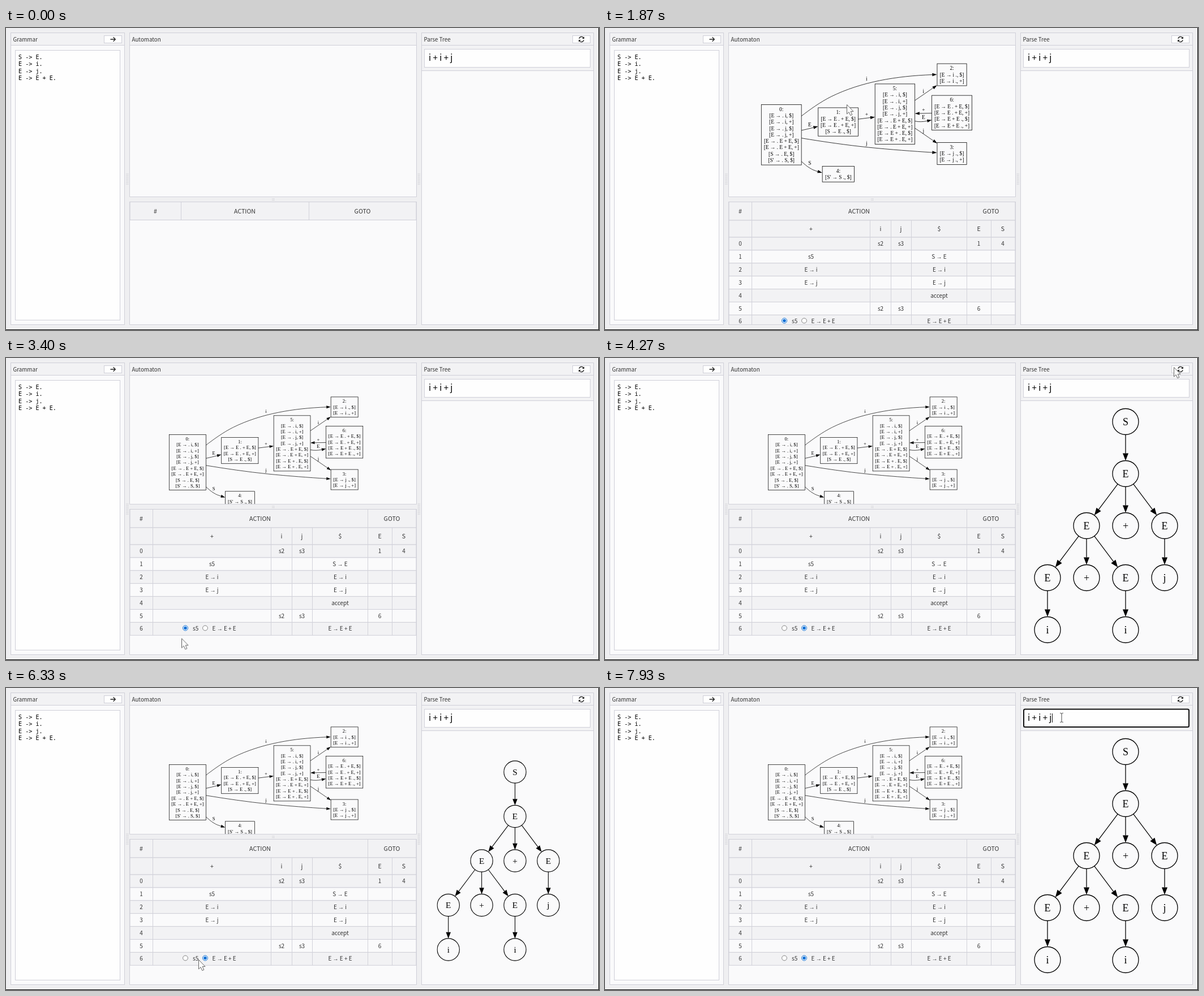
Write an HTML page that moves like this. It is 1048x534 px and loops after 8000 ms.

```html
<!DOCTYPE html>
<html lang="en">
<head>
<meta charset="utf-8">
<title>Parser playground</title>
<style>
  html, body { margin: 0; width: 100%; height: 100%; overflow: hidden; background: #efeff1; }
  svg { display: block; width: 1048px; height: 534px; }
  text { font: 10px "Noto Sans CJK JP", "Noto Sans CJK SC", "Noto Sans CJK", "Open Sans", sans-serif; fill: #333; white-space: pre; }
  .mid { text-anchor: middle; }
  .head { font-size: 10.6px; }
  .title { font-size: 9.8px; }
  .input { font-size: 15px; fill: #000; }
  .code { font: 10.1px "DejaVu Sans Mono", monospace; fill: #000; }
  .to { font-family: "Liberation Sans", sans-serif; }
  .serif text { font-family: "Liberation Serif", serif; fill: #000; text-anchor: middle; }
  .graph text { font-size: 12.05px; }
  .tree text { font-size: 18px; }
  .graph, .tree { fill: none; stroke: #000; }
  .tree { stroke-width: 1.28; }
  .serif text, .tip { stroke: none; }
  .tip { fill: #000; }
  .line { stroke: #d2d2da; fill: none; }
  .anim { animation: 8s infinite step-end; }
  #cursor { animation: cursor 8s infinite ease-in-out; }
  #bottom { animation: bottom 8s infinite ease-in-out; }
  #graph { transform-origin: 426.8px 135.5px; }
</style>
</head>
<body>
<svg id="stage" viewBox="0 0 1048 534"></svg>
<script>
const BODY = '#efeff1', PANE = '#fafafb', SHADE = '#f2f2f4', EDGE = '#cfcfd8';

// ---- drawing helpers ----
const rect = (x, y, x2, y2, fill, stroke = EDGE, extra = '') =>
  `<rect x="${x}" y="${y}" width="${x2 - x}" height="${y2 - y}" fill="${fill}" stroke="${stroke}" ${extra}/>`;
const text = (x, y, s, cls = '') => `<text x="${x}" y="${y}" class="${cls}">${s}</text>`;
const rule = s => String(s).replace('→', '<tspan class="to">→</tspan>');
const cell = (x, y, s, cls = '') => text(x, y + 3.7, rule(s), 'mid ' + cls);
const lines = d => `<path class="line" d="${d}"/>`;
const group = (id, cls, body) => `<g id="${id}" class="${cls}">${body}</g>`;
const dots = (x, y, cols, rows) => {
  let d = '';
  for (let c = 0; c < cols; c++)
    for (let r = 0; r < rows; r++) d += `M${x + c * 2.5} ${y + r * 2.6}h1`;
  return `<path d="${d}" stroke="#b4b4bc"/>`;
};
const pane = (x, x2, title) =>
  rect(x, 8.5, x2, 524.5, PANE) + rect(x, 8.5, x2, 30.5, SHADE) + text(x + 4, 23.6, title, 'title');
const radio = (x, y, on) => on
  ? `<circle cx="${x}" cy="${y}" r="4.5" fill="#fff" stroke="#0b6fd6"/><circle cx="${x}" cy="${y}" r="2.8" fill="#0b6fd6"/>`
  : `<circle cx="${x}" cy="${y}" r="4.4" fill="#fff" stroke="#777" stroke-width=".9"/>`;

// ---- automaton ----
const LINE = 14.48;
const state = (n, x, y, x2, items) => {
  const all = [n + ':', ...items.map(s => `[${s}]`)];
  return rect(x, y, x2, y + all.length * LINE + 6.6, 'none', '#000') +
    all.map((s, i) => text((x + x2) / 2, y + 3.3 + LINE * (i + .5) + 4, s)).join('');
};
const both = (...items) => items.flatMap(s => [s + ', $', s + ', +']);
const edge = (d, label, x, y) => `<path d="${d}" marker-end="url(#tip)"/>` + text(x, y + 4, label);
const start = both('E → . i', 'E → . j', 'E → . E + E');
const automaton = '<g transform="translate(.5 .5)">' +
  state(0, 233, 135, 324, [...start, 'S → . E, $', "S' → . S, $"]) +
  state(1, 362, 142, 453, [...both('E → E . + E'), 'S → E ., $']) +
  state(2, 632, 42, 699, both('E → i .')) +
  state(3, 632, 221, 699, both('E → j .')) +
  state(4, 371.5, 275, 444, ["S' → S ., $"]) +
  state(5, 491, 88, 581.5, [...start, ...both('E → E + . E')]) +
  state(6, 620, 114, 711, both('E → E . + E', 'E → E + E .')) +
  edge('M324 161C342 147 367 129 391 117C460 83 540 70 621 67', 'i', 472, 77) +
  edge('M324 193.5Q338 190.5 351.5 187', 'E', 343, 181) +
  edge('M324 211C372 219 427 227 476 232C525 237 580 241 621 243.6', 'j', 472, 223) +
  edge('M324 264C331 270 336 275 343 279C349 283 355 285 361 286.8', 'S', 343, 268) +
  edge('M453 168L480.5 164.5', '+', 472, 157) +
  edge('M581.5 125.5L623 97', 'i', 601, 104.5) +
  edge('M581.5 172.5C591 174.5 600 174 609.5 172', 'E', 601, 164) +
  edge('M620 154.5L592 155', '+', 601, 147) +
  edge('M581.5 188.5C595 197 610 208 623.5 217', 'j', 601, 194) + '</g>';

// ---- parse tree: [label, column, ...children] ----
const treeAt = (node, row = 0) => {
  const [label, col, ...kids] = node;
  const x = 782 + 69 * col, y = 112.5 + 92 * row;
  const links = kids.map(kid => {
    const dx = (kid[1] - col) * 69, len = Math.hypot(dx, 92), ux = dx / len, uy = 92 / len;
    return `<path d="M${x + 23 * ux} ${y + 23 * uy}L${x + dx - 36 * ux} ${y + 92 - 36 * uy}" marker-end="url(#bigTip)"/>`;
  });
  return `<circle cx="${x}" cy="${y}" r="23"/>` + text(x, y + 6, label) +
    links.join('') + kids.map(kid => treeAt(kid, row + 1)).join('');
};
const leftTree = treeAt(['S', 2, ['E', 2,
  ['E', 1, ['E', 0, ['i', 0]], ['+', 1], ['E', 2, ['i', 2]]], ['+', 2], ['E', 3, ['j', 3]]]]);
const rightTree = treeAt(['S', 1, ['E', 1,
  ['E', 0, ['i', 0]], ['+', 1], ['E', 2, ['E', 1, ['i', 1]], ['+', 2], ['E', 3, ['j', 3]]]]]);

// ---- parse table ----
const emptyTable = rect(219, 307.5, 725, 339.5, SHADE) + lines('M309.5 308v31M535.5 308v31') +
  cell(264, 324, '#', 'head') + cell(422, 324, 'ACTION', 'head') + cell(630, 324, 'GOTO', 'head');

const COLS = [239, 364, 487, 523, 590.5, 660.5, 703];
const ROWS = [
  ['', 's2', 's3', '', '1', '4'],
  ['s5', '', '', 'S → E'],
  ['E → i', '', '', 'E → i'],
  ['E → j', '', '', 'E → j'],
  ['', '', '', 'accept'],
  ['', 's2', 's3', '', '6'],
  ['', '', '', 'E → E + E']
];
const rowTop = i => 370 + 22.9 * i;
const fullTable = rect(219, 307.5, 725, 340, SHADE) + rect(219, 340, 725, 370, SHADE) +
  cell(239, 324, '#', 'head') + cell(449, 324, 'ACTION', 'head') + cell(682, 324, 'GOTO', 'head') +
  ['', '+', 'i', 'j', '$', 'E', 'S'].map((s, i) => cell(COLS[i], 355, s, 'head')).join('') +
  ROWS.map((row, i) => rect(219, rowTop(i), 725, rowTop(i + 1), i % 2 ? PANE : SHADE) +
    [i, ...row].map((s, c) => cell(COLS[c], rowTop(i) + 11.3, s)).join('')).join('') +
  lines('M259.5 308V530M639.5 308V530' + [468.5, 505.5, 541.5, 682.5].map(x => `M${x} 340V530`).join('')) +
  text(330, 522.4, 's5') + text(364.5, 522.4, rule('E → E + E'));
const radios = first => radio(317, 517.5, first) + radio(352, 517.5, !first);

// ---- stage ----
const BEAM = 'M-3-8H-1L0-7L1-8H3M-3 8H-1L0 7L1 8H3M0-7V7';
document.getElementById('stage').innerHTML = `
  <defs>
    <marker id="tip" orient="auto" markerUnits="userSpaceOnUse" overflow="visible"><path class="tip" d="M0-3.5L10.5 0L0 3.5z"/></marker>
    <marker id="bigTip" orient="auto" markerUnits="userSpaceOnUse" overflow="visible"><path class="tip" d="M0-5L13 0L0 5z"/></marker>
  </defs>` +
  rect(0, 0, 1048, 534, BODY, 'none') +
  pane(8.5, 209.5, 'Grammar') + rect(16.5, 39.5, 201.5, 516.5, '#fefefe') +
  ['S -> E.', 'E -> i.', 'E -> j.', 'E -> E + E.'].map((s, i) => text(22, 55 + 12.35 * i, s, 'code')).join('') +
  rect(173.5, 13.5, 204.5, 26.5, '#fefefe') +
  '<path d="M184.5 20h8.5M189.6 16.3l3.7 3.7l-3.7 3.7" fill="none" stroke="#222" stroke-width="1.3"/>' +
  pane(218.5, 725.5, 'Automaton') +
  group('graph', 'serif graph anim', automaton) +
  group('bottom', '',
    rect(218, 298.5, 726, 307, BODY, 'none') + lines('M218 298.5H726') + dots(470.5, 302, 2, 2) +
    rect(218.5, 307.5, 725.5, 600, PANE) +
    group('emptyTable', 'anim', emptyTable) + group('fullTable', 'anim', fullTable) +
    group('shiftOn', 'anim', radios(true)) + group('reduceOn', 'anim', radios(false))) +
  rect(210, 525, 733, 534, BODY, 'none') + lines('M218 524.5H726') +
  dots(212.5, 258, 2, 8) + dots(728, 258, 2, 8) +
  pane(734.5, 1038.5, 'Parse Tree') + rect(734.5, 30.5, 1038.5, 75.5, SHADE) +
  rect(1001.5, 13.5, 1032.5, 26.5, '#fefefe') +
  `<path d="M1012.8 18.8a4.3 4.3 0 0 1 7.7-1.6M1021.2 21.2a4.3 4.3 0 0 1-7.7 1.6" fill="none" stroke="#222" stroke-width="1.3"/>
   <path d="M1021.9 15.2v3.9h-3.9zM1012.1 24.8v-3.9h3.9z" fill="#222"/>` +
  rect(739.5, 37.5, 1032.5, 69.5, '#fefefe') +
  group('focus', 'anim', rect(740, 37.5, 1032, 69, '#fefefe', '#111', 'stroke-width="2" rx="2.5"') +
    '<path d="M790.5 45v16" stroke="#111"/>') +
  text(747, 58, 'i + i + j', 'input') +
  group('leftTree', 'serif tree anim', leftTree) + group('rightTree', 'serif tree anim', rightTree) +
  '<path d="M1047.5 0V533.5H0" fill="none" stroke="#000"/>' +
  group('cursor', '',
    group('arrow', 'anim', '<path d="M.5 .5V17L4.1 13.6L6.8 19.6L9.8 18.3L7.2 12.5H12z" fill="#fcfcfc" stroke="#666" stroke-linejoin="round"/>') +
    group('ibeam', 'anim', `<g fill="none"><path d="${BEAM}" stroke="#fff" stroke-width="3"/><path d="${BEAM}" stroke="#444"/></g>`));

// ---- timeline (ms within the 8 s loop) ----
const sheet = [];
const keyframes = (id, steps) =>
  sheet.push(`@keyframes ${id}{${steps.map(([t, css]) => `${t / 80}%{${css}}`).join('')}}`);
const play = id => sheet.push(`#${id}{animation-name:${id}}`);
const shown = (id, ...spans) => {
  const steps = [[0, 'visibility:hidden']];
  for (const [from, to] of spans) steps.push([from, 'visibility:visible'], [to, 'visibility:hidden']);
  keyframes(id, steps);
  play(id);
};
const move = (x, y, k = 1) => `transform:translate(${x}px,${y}px) scale(${k})`;

shown('emptyTable', [0, 930]);
shown('fullTable', [930, 8000]);
shown('shiftOn', [930, 3670], [6520, 6980]);
shown('reduceOn', [3670, 6520], [6980, 8000]);
shown('rightTree', [6550, 7000]);
shown('focus', [7870, 8000]);
shown('arrow', [70, 7600]);
shown('ibeam', [7600, 8000]);

keyframes('graph', [
  [0, 'visibility:hidden'], [930, 'visibility:visible;transform:none'],
  ...[1, 2, 3, 4].map(n => [1600 + 80 * n, `visibility:visible;transform:scale(${.92 ** n})`]),
  [8000, `visibility:visible;transform:scale(${.92 ** 4})`]
]);
play('graph');

const tree = (t, vis, ...view) => [t, `visibility:${vis};${move(...view)}`];
keyframes('leftTree', [
  tree(0, 'hidden', 0, 0), tree(4270, 'visible', 0, 0),
  tree(4930, 'visible', 58.4, 29.3, .9235), tree(5330, 'visible', 114.5, 52.5, .8533),
  tree(6550, 'hidden', 0, 0), tree(7000, 'visible', 0, 0), tree(8000, 'visible', 0, 0)
]);
play('leftTree');

keyframes('bottom', [[0, move(0, 0)], [2700, move(0, 0)], [3050, move(0, -40)], [8000, move(0, -40)]]);

keyframes('cursor', [
  [0, 300, 160], [70, 300, 160], [700, 188, 19], [950, 188, 19], [1270, 217.5, 40],
  [1600, 427, 135], [1950, 427, 135], [2330, 475, 404.5], [2600, 472, 303], [2700, 472, 303],
  [3050, 472, 263], [3400, 310, 495.5], [3620, 352, 478], [3720, 352, 478], [4180, 1005, 16],
  [4380, 1005, 16], [4850, 757, 388], [5070, 781.5, 363], [5300, 800, 336], [5400, 800, 336],
  [6030, 352, 500], [6330, 340, 480], [6450, 317, 477], [6600, 317, 477], [6900, 352, 478],
  [7050, 352, 478], [7700, 807, 52.5], [8000, 807, 52.5]
].map(([t, x, y]) => [t, move(x, y)]));

document.head.appendChild(document.createElement('style')).textContent = sheet.join('\n');
</script>
</body>
</html>
```
